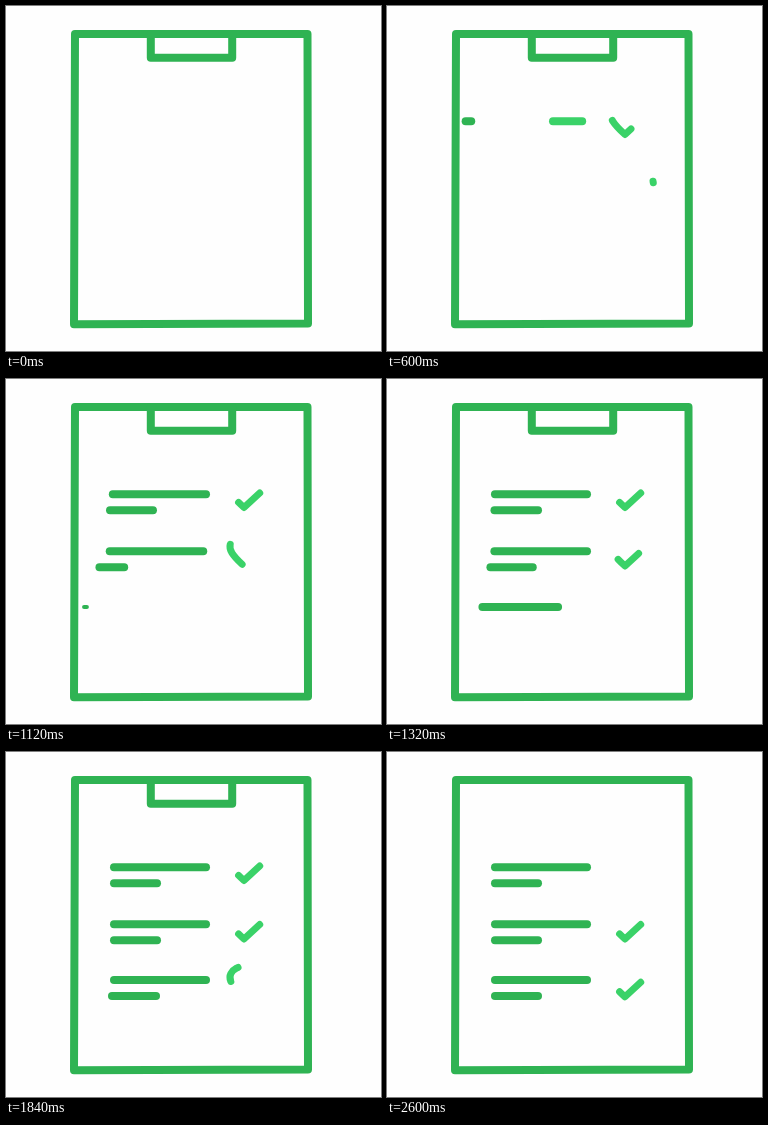
Write an HTML page that moves like this. It is 375 by 345 pixels and loops after 2640 ms.

```html
<!DOCTYPE html>
<html lang="en">
<head>
<meta charset="utf-8">
<title>Checklist</title>
<style>
  html, body { margin: 0; width: 100%; height: 100%; overflow: hidden; background: #fefefe; }
  svg { display: block; width: 375px; height: 345px; }
  svg * { fill: none; stroke-linecap: round; stroke-linejoin: round; }
  .dark { stroke: #2fb353; stroke-width: 8; }
  .light { stroke: #3ad268; stroke-width: 8; }
  .check { stroke-width: 7; }
</style>
</head>
<body>
<svg id="stage" viewBox="0 0 375 345">
  <path class="dark" d="M69 28H301.5L302 317.5L68 318.3Z"/>
  <path class="dark" id="clip" d="M144.8 28H226.2V51.7H144.8Z"/>
</svg>
<script>
const LOOP = 2640, STEP = 40, RESET = 2600;
const START_X = 77.5, LEFT = 108;
const stage = document.getElementById('stage');
const clip = document.getElementById('clip');

// One and a third turns anticlockwise, then inwards to the tick.
const CHECK = 'M266.5 121.5A24.5 24.5 0 0 0 217.5 121.5A24.5 24.5 0 0 0 266.5 121.5' +
  'A24.5 24.5 0 0 0 230.5 99.9C225 102.8 221.5 108 226 115.5' +
  'C228.5 119.5 233 124 238 128.5L253.7 114';
const CHECK_TIME = 970;
const STROKE_LENGTH = [[0, 0], [80, 20], [440, 18], [520, 24], [600, 27], [CHECK_TIME, 30]];

const clamp = v => Math.min(1, Math.max(0, v));
const easeOut = (t, duration) => 1 - (1 - clamp(t / duration)) ** 3;
const mix = (a, b, p) => a + (b - a) * p;

function lookup(table, t) {
  const i = table.findIndex(([time]) => time >= t);
  if (i < 0) return table[table.length - 1][1];
  if (i === 0) return table[0][1];
  const [t0, v0] = table[i - 1], [t1, v1] = table[i];
  return mix(v0, v1, (t - t0) / (t1 - t0));
}

function add(tag, attributes) {
  const node = document.createElementNS('http://www.w3.org/2000/svg', tag);
  for (const name in attributes) node.setAttribute(name, attributes[name]);
  return stage.appendChild(node);
}

function show(node, visible) {
  node.style.visibility = visible ? 'visible' : 'hidden';
}

// A bar whose head and tail leave the board's edge at different speeds.
function makeBar(o) {
  const node = add('line', { class: o.color || 'dark', y1: o.y, y2: o.y });
  return t => {
    const local = t - o.start;
    show(node, local > 0 && t < (o.end || LOOP));
    const tail = mix(START_X, o.left || LEFT, easeOut(local - (o.tailDelay || 0), o.tailTime || 800));
    const head = mix(START_X, o.right, easeOut(local - (o.headDelay || 0), o.headTime));
    node.setAttribute('x1', tail);
    node.setAttribute('x2', Math.max(head, tail));
    node.style.strokeWidth = 8 * clamp(local / 10);
  };
}

function makeCheck({ dy, start, end = LOOP }) {
  const node = add('path', { class: 'light check', d: CHECK, transform: `translate(0 ${dy})` });
  const total = node.getTotalLength();
  return t => {
    const local = t - start;
    show(node, local > 0 && t < end);
    const head = total * easeOut(local, CHECK_TIME);
    const length = Math.min(head, lookup(STROKE_LENGTH, local));
    node.style.strokeDasharray = `${length} ${2 * total}`;
    node.style.strokeDashoffset = length - head;
  };
}

const rows = [
  { y: 115.2, bar: 590, shortBar: 725, dy: 0, check: 0, end: RESET },
  { y: 172.2, bar: 735, shortBar: 945, dy: 58.5, check: 594 },
  { y: 228, bar: 1115, shortBar: 1363, dy: 116.3, check: 1400 }
];

const parts = [
  makeBar({ color: 'light', y: 115.2, start: 0, end: 1000, left: 200, right: 200,
            headTime: 910, tailDelay: 75, tailTime: 1510 })
];
for (const row of rows) {
  parts.push(
    makeBar({ y: row.y, start: row.bar, right: 200, headTime: 537 }),
    makeBar({ y: row.y + 16, start: row.shortBar, right: 151, headDelay: 40, headTime: 573 }),
    makeCheck({ dy: row.dy, start: row.check, end: row.end })
  );
}

function draw() {
  const t = Math.floor(performance.now() % LOOP / STEP) * STEP;
  show(clip, t < RESET);
  parts.forEach(update => update(t));
  requestAnimationFrame(draw);
}
draw();
</script>
</body>
</html>
```
